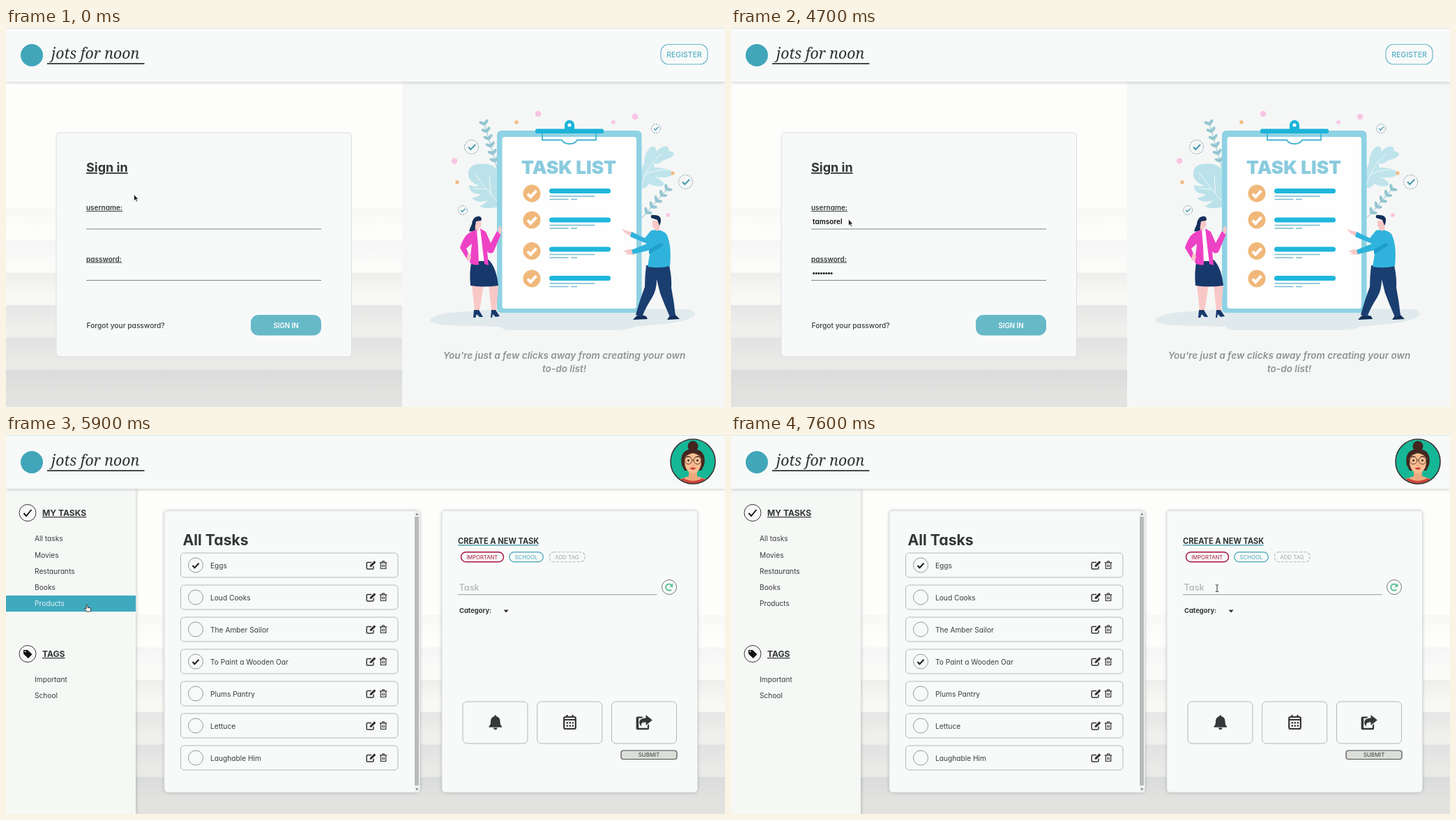
An HTML page for the animation above (8 s loop, 1031x543 px).

```html
<!DOCTYPE html>
<html lang="en">
<head>
<meta charset="utf-8">
<title>To-do list demo</title>
<style>
  html, body { margin: 0; width: 100%; height: 100%; overflow: hidden; background: #fdfdfc; }
  svg { display: block; width: 1031px; height: 543px; }
  text { font: 400 10.2px Inter, "Open Sans", sans-serif; font-feature-settings: "cv11"; fill: #3a3d3d; white-space: pre; }
  .semi { font-weight: 600; }
  .bold { font-weight: 700; fill: #333636; }
  .mid { text-anchor: middle; }
  .under { text-decoration: underline; }
  .motto { font: italic 600 13.6px Inter, sans-serif; fill: #8f9493; }
  .card { fill: #f8fafa; stroke: #dcdfdf; filter: drop-shadow(0 0 2px #0003); }
  .line { fill: none; stroke: #333; }
  .round { stroke-linecap: round; stroke-linejoin: round; }
  .box { fill: none; stroke: #b4b8b8; }
  .row.hover .box { stroke: #6db7c6; filter: drop-shadow(0 0 2px #4aa9bc); }
  .item rect { fill: none; }
  .item.hover rect { fill: #3fa9be; }
  .item.hover text { fill: #e4f3f5; }
</style>
</head>
<body>
<svg viewBox="0 0 1031 543">
  <defs><clipPath id="face"><circle cx="985" cy="38" r="31.5"/></clipPath></defs>
  <g id="backdrop"></g>

  <g id="login">
    <path d="M568 77h463v466H568z" fill="#f5f7f6"/>
    <g id="picture"></g>
    <rect class="card" x="72" y="150" width="423.5" height="321" rx="5" style="filter:none"/>
    <text class="bold under" x="115" y="206" style="font-size:18px">Sign in</text>
    <text class="semi under" x="115" y="261" style="font-size:10px">username:</text>
    <text class="semi under" x="115" y="334.5" style="font-size:10px">password:</text>
    <path d="M115 288h337M115 361.5h337" stroke="#808484"/>
    <text x="115.5" y="430" style="font-weight:500">Forgot your password?</text>
    <rect x="351" y="411" width="101" height="29.5" rx="11" fill="#67b9c8"/>
    <text class="semi mid" x="401.5" y="430" style="fill:#fff;font-size:9.7px">SIGN IN</text>
    <text id="user" class="semi" x="117" y="281" style="fill:#111;font-size:10px"></text>
    <path id="dots" class="round" stroke="#111" stroke-width="3" stroke-dasharray="0 3.65"/>
    <rect id="caret" width="1" height="14" fill="#222"/>
    <text class="mid motto" x="800.5" y="474">You're just a few clicks away from creating your own</text>
    <text class="mid motto" x="800.5" y="493">to-do list!</text>
  </g>

  <g id="app">
    <rect class="card" x="227" y="108.5" width="366.5" height="403.5" rx="5"/>
    <rect class="card" x="625" y="108.5" width="366.5" height="403.5" rx="5"/>
    <text class="bold" x="253.5" y="158" style="font-size:21.2px">All Tasks</text>
    <g id="rows"></g>
    <path d="M0 77h186v466H0z" fill="#f6f8f6" style="filter:drop-shadow(1px 0 2px #0003)"/>
    <g id="menu"></g>
    <text class="bold under" x="52" y="116" style="font-size:12.1px">MY TASKS</text>
    <text class="bold under" x="52" y="318" style="font-size:12.1px">TAGS</text>

    <text class="bold" x="648" y="155.5" style="font-size:11.1px">CREATE A NEW TASK</text>
    <path d="M648 157.8h115.5" stroke="#3c8fa2" stroke-width="1.2"/>
    <g fill="none" stroke-width="1.4">
      <rect x="652.5" y="167.7" width="61" height="14" rx="7" stroke="#a8143c"/>
      <rect x="721.8" y="167.7" width="48.5" height="14" rx="7" stroke="#5db1c1"/>
      <rect x="779.5" y="167.7" width="50.5" height="14" rx="6" stroke="#b2b6b6" stroke-width="1.1" stroke-dasharray="4 2"/>
    </g>
    <text class="mid" x="682.7" y="177.5" style="font-size:7.7px;fill:#a8143c">IMPORTANT</text>
    <text class="mid" x="746" y="177.5" style="font-size:7.8px;fill:#48a3b5">SCHOOL</text>
    <text class="mid" x="804.5" y="177.5" style="font-size:7.9px;fill:#a0a4a4">ADD TAG</text>
    <text class="semi" x="649.5" y="222.5" style="font-size:12.6px;fill:#b9bdbd">Task</text>
    <path d="M648 228.7h285.5" stroke="#969a9a"/>
    <circle class="line" cx="951" cy="218" r="10.5" style="stroke:#777"/>
    <path d="M954 221.5a4.6 4.6 0 1 1 .2-6.5" fill="none" stroke="#56c391" stroke-width="1.9"/>
    <path d="M956.3 212.5v5.2h-5.2z" fill="#56c391"/>
    <text class="bold" x="650" y="255" style="font-size:9.4px">Category:</text>
    <path d="M713.5 250.5h7.2l-3.6 4z" fill="#333"/>
    <rect class="box" x="655" y="382" width="93" height="60" rx="6"/>
    <rect class="box" x="761.7" y="382" width="93" height="60" rx="6"/>
    <rect class="box" x="868.5" y="382" width="93" height="60" rx="6"/>
    <g fill="#343838">
      <path d="M700.5 403v-1.5h2.5v1.5c4 1 5.5 4 5.5 7.5 0 4 1 5.5 2.5 7v1.2h-18.5v-1.2c1.5-1.5 2.5-3 2.5-7 0-3.5 1.5-6.5 5.5-7.5zM699 419.5h5.5a2.7 2.5 0 0 1-5.5 0z"/>
      <path d="M908 403.5h5.5l-2 2.2h-4.3v14h12.6v-4l2.3-1.5v6a2 2 0 0 1-2 2h-14.5a2 2 0 0 1-2-2v-14.7a2 2 0 0 1 2-2z"/>
      <path d="M917.5 401l9.3 7.5-9.3 7.5v-4.5c-6 0-7.5 2-6 6.5-6-5.5-4-12.3 6-12.5z"/>
    </g>
    <g class="line" stroke-width="2.2">
      <rect x="800.2" y="404" width="16.6" height="17" rx="2"/>
      <path d="M800 408h17M804.5 401v4M812.5 401v4"/>
      <path d="M803.5 412.3h10.5M803.5 416.7h10.5" stroke-dasharray="2.5 1.6"/>
    </g>
    <rect x="882" y="452" width="80" height="12.5" rx="3.5" fill="#dcded8" stroke="#4a4d4d" stroke-width="1.2"/>
    <text class="mid" x="922" y="461.2" style="font-size:7.9px">SUBMIT</text>
  </g>

  <path d="M0 0h1031v77H0z" fill="#f8fafa" style="filter:drop-shadow(0 1px 2px #0003)"/>
  <path d="M0 .5h1031" stroke="#dde6e8"/>
  <circle cx="37" cy="39" r="16" fill="#41a6ba"/>
  <text x="65" y="44" style="font:italic 300 21.3px 'Noto Serif',serif;fill:#303333">jots for noon</text>
  <path d="M59 51.2h139.5" stroke="#2d3030" stroke-width="1.8"/>
  <g id="register">
    <rect x="939" y="23.5" width="67" height="28.5" rx="11" fill="none" stroke="#6cb8c9" stroke-width="1.2"/>
    <text class="mid" x="972.5" y="41.5" style="font-size:10.5px;font-weight:500;fill:#55adc0">REGISTER</text>
  </g>

  <g id="loaded">
    <g class="line"><circle cx="31" cy="111.5" r="12"/><circle cx="31" cy="313.5" r="12"/></g>
    <path class="line" d="M25.5 112l3.5 4 7.5-9" stroke-width="1.9" style="stroke:#111"/>
    <path d="M25 308h6l6.5 6.2-5.6 5.8-6.9-6.5z" fill="#111"/><circle cx="27.5" cy="310.3" r="1" fill="#fff"/>
    <g clip-path="url(#face)">
      <path d="M950 0h70v75h-70z" fill="#15b796"/>
      <circle cx="985" cy="16" r="7.5" fill="#42261f"/>
      <path d="M969 43c-3-14 3-23 16-23s19 9 16 23l-4 8h-24z" fill="#42261f"/>
      <path d="M979 48h12v11l12 4 8 12h-52l8-12 12-4z" fill="#eda97e"/>
      <path d="M962 75c1-9 5-12 10-13 8 5 18 5 26 0 5 1 9 4 10 13z" fill="#cf4439"/>
      <path d="M973 35c1-6 7-8 12-9 5 1 11 3 12 9 1 10-4 20-12 20s-13-10-12-20z" fill="#f8bd91"/>
      <path d="M974.5 31.5q4-2 7 0M988.5 31.5q4-2 7 0" class="line" style="stroke:#42261f"/>
      <g class="line" style="stroke:#5b3930"><circle cx="978.5" cy="36.5" r="5.3"/><circle cx="991.5" cy="36.5" r="5.3"/><path d="M984 36h2M969 34l4 1M997 35l4-1"/></g>
      <circle cx="978.5" cy="36.5" r="1.3"/><circle cx="991.5" cy="36.5" r="1.3"/>
      <path d="M983.5 43.5q1.5 1 3 0" class="line" style="stroke:#d98c66"/>
      <path d="M980.5 47.5q4.5-2 9 0-4.5 4.5-9 0z" fill="#d23b3b"/>
    </g>
  </g>
  <circle id="ring" class="line" cx="985" cy="38" r="32" stroke-width="1.6"/>

  <g id="cursor">
    <path id="arrow" d="M0 0V9L2.1 7.2 3.6 10.5 5 9.9 3.6 6.7H6.3z" fill="#222" stroke="#fff" stroke-width=".6"/>
    <path id="beam" class="line" d="M-1.7-4.7h1.2l1 .7 1-.7h1.2M-1.7 5h1.2l1-.7 1 .7h1.2M.5-4v8.5"/>
    <path id="hand" d="M0 1q1-2 2 0v3.2l4 .8q1 .4.8 1.8l-.8 3.2H.8L-2.5 6.3q0-1.5 1.3-.8L0 6.3z" fill="#fff" stroke="#222" stroke-width=".9"/>
  </g>
</svg>
<script>
const $ = id => document.getElementById(id);
const each = (list, draw) => list.map(draw).join('');
const range = n => [...Array(n).keys()];
const tick = (x, y, s) => `<path d="M${x - 4 * s} ${y}l${3 * s} ${3.2 * s} ${6 * s} ${-6.4 * s}" fill="none"/>`;

// Backdrop: steps that start dark and fade out
const bands = [['#f8f9f7', '#fdfdfc'], ['#f4f5f4', '#fbfbfa'], ['#eeefed', '#f8f8f5'],
  ['#e5e6e5', '#efefed'], ['#e1e2e1', '#e9e9e7'], ['#d9dcdb', '#e2e2e0']];
$('backdrop').innerHTML = each(bands, ([top, low], i) => `
  <linearGradient id="band${i}" x2="0" y2="1"><stop stop-color="${top}"/><stop offset=".6" stop-color="${low}"/></linearGradient>
  <rect y="${258 + 46.4 * i}" width="1031" height="54" fill="url(#band${i})"/>`);

// Login illustration
const dot = color => ([x, y, r]) => `<circle cx="${x}" cy="${y}" r="${r}" fill="${color}"/>`;
const sprig = (x, y, angle, n) => `<g transform="translate(${x} ${y}) rotate(${angle})" fill="#95c6d1">
  <path d="M0 0V${-n * 11}" stroke="#95c6d1"/>${each(range(n), i => `
  <ellipse cx="-5.5" cy="${-11 * i - 9}" rx="5" ry="2.2" transform="rotate(38 0 ${-11 * i - 6})"/>
  <ellipse cx="5.5" cy="${-11 * i - 9}" rx="5" ry="2.2" transform="rotate(-38 0 ${-11 * i - 6})"/>`)}</g>`;
const badge = ([x, y, r]) => `<g stroke="#86a5af" fill="none"><circle cx="${x}" cy="${y}" r="${r}" stroke-dasharray="2.5 1.2"/>
  <g stroke="#4499b4" stroke-width="${r / 5}">${tick(x, y, r / 9)}</g></g>`;
const lobe = ([x, y, rx, ry, a]) => `<ellipse cx="${x}" cy="${y}" rx="${rx}" ry="${ry}" transform="rotate(${a} ${x} ${y})"/>`;
const job = ([disc, bar]) => `<circle cx="754" cy="${disc}" r="12.5" fill="#f0b87a"/>
  <g stroke="#fff" stroke-width="4">${tick(753.5, disc + .5, 1.4)}</g>
  <rect x="779" y="${bar - 3.5}" width="88" height="7" rx="3.5" fill="#1eb7db"/>
  <path d="M779.5 ${bar + 7.5}h65M779.5 ${bar + 12}h27M810 ${bar + 12}h9" stroke="#74bccd" stroke-width="1.3"/>`;

$('picture').innerHTML = `
  <path d="M608 418q10-11 55-12l50-4h190l75 1q12 3 9 9-12 10-56 13l-30 3q-8 5-30 5H724q-12 0-15-5l-75-2q-25-2-26-8z" fill="#e0eaed"/>
  <path d="M706 256q-18 5-27-1 8-3 12-8-16 5-23-4 8 0 13-5-17 0-17-13 8 3 15 1-18-6-16-20 2-10 13-11 24-3 31 12z" fill="#bbe2ea"/>
  <path d="M706 250q-19-20-35-43M690 231l-20-1M695 238l-2-27" fill="none" stroke="#f5f7f6"/>
  <g fill="#bfe4ec">${each([[924, 186, 8, 17, 16], [939, 182, 8, 15, 42], [944, 183, 6, 14, 78], [936, 207, 7, 20, 95], [928, 219, 6, 16, 110], [919, 208, 9, 22, 15]], lobe)}</g>
  <path d="M911 226q8-30 30-47M915 211q14-9 36-8" fill="none" stroke="#eff7f8"/>
  ${sprig(704, 200, -16, 6)}${sprig(912, 272, 41, 5)}
  ${each([[763, 123, 4.3], [902, 127, 4.3], [643, 190.5, 4.2], [871, 135, 2.8], [949, 268, 2.8]], dot('#f8c4e3'))}
  ${each([[732, 135, 2.8], [647, 221, 2.8], [956, 208, 2.8]], dot('#f2bd86'))}
  ${each([[667.5, 170.5, 10], [932, 144, 6.5], [974.5, 220.5, 10], [655, 261, 6.5]], badge)}
  <rect x="704" y="147" width="207.5" height="261" rx="6" fill="#8ed2e3"/>
  <rect x="711.5" y="156" width="192.5" height="246" rx="4" fill="#fefefe"/>
  <path d="M769 151v9.5h28q3 5.5 11 5.5t11-5.5h27V151" fill="none" stroke="#45b4cf" stroke-width="1.8"/>
  <path d="M801 146v-7a7 7 0 0 1 14 0v7z" fill="#1cb3d9"/><circle cx="808" cy="139" r="2.6" fill="#f5f7f6"/>
  <rect x="759" y="144.5" width="98" height="6.5" rx="2.5" fill="#1cb3d9"/>
  <text class="mid" x="807" y="208.5" style="font-size:26.2px;font-weight:900;fill:#8acbde">TASK LIST</text>
  ${each([[237, 233.5], [275, 275], [319.5, 317], [359, 358.5]], job)}

  <g id="woman">
    <path d="M668 367l4 39h7l6-39zM692 367l4 39h7l3-39z" fill="#f8c8c7"/>
    <path d="M671 404h7l6 10h-5l-4-4-2 5h-3zM696 404h6l6 9-6 1-4-4-1 5h-2z" fill="#17386b"/>
    <path d="M668 332h24c8 8 12 20 14 37q-21 3-40 0-2-20 2-37z" fill="#17386b"/>
    <path d="M673 288l11-1 3 47h-13z" fill="#fff"/>
    <path d="M664 291q2-6 4-10 1-10 8-11 6-1 6 5l-5 4-3 9q-4 5-10 3z" fill="#15305a"/>
    <path d="M674 277l7-1 .5 7q-1 4-4 3l.5 4-4 1-1.500-5z" fill="#f8c8c7"/>
    <path d="M675 289q-11 3-16 9-6 9-8 17 5 8 11 18l4-3-6-14 8-7-3 27q6 5 13 3l-1-26z" fill="#ee42c5"/>
    <path d="M680 287l8 5 7 16 9-17 6 4-11 26q-5 4-9-1l2 20-6-2z" fill="#ee42c5"/>
    <path d="M706 293q-1-8 2-10l3 6-2 7zM660 331l3-10 4 7-2 6z" fill="#f8c8c7"/>
  </g>

  <g id="man">
    <path d="M899 418q4-5 9-8l10 3 2 4zM948 418l4-6 7-2 7 7z" fill="#122e58"/>
    <path d="M918 340h33q4 18 3 32 4 20 6 40l-8 2q-8-18-14-34l-5-20q0 16-7 27-8 12-14 27l-9-3q6-22 13-40 0-16 2-31z" fill="#1b3e70"/>
    <path d="M900 293l-8-2-9-3 4 5 6 4 7 2zM901 318l-8-1-8 3 6 2-3 2 13 1z" fill="#f8c8c7"/>
    <path d="M897 292l19 9 9-11q14-3 22 5 8 16 5 46-15 4-32 1l4-24-25 6-2-6 22-9-24-10z" fill="#2fb3dc"/>
    <path d="M922 317l17-9 4 3-21 13z" fill="#1c9fca"/>
    <path d="M927 276h11l-1 13q-4 4-7-1l-3-4z" fill="#f8c8c7"/>
    <path d="M925 272q-1-5 3-4 10-1 11 6 0 6-2 9l-3-8z" fill="#122e58"/>
  </g>`;

// Task rows
const tasks = ['Eggs', 'Loud Cooks', 'The Amber Sailor', 'To Paint a Wooden Oar', 'Plums Pantry', 'Lettuce', 'Laughable Him'];
$('rows').innerHTML = each(tasks, (name, i) => `<g class="row" transform="translate(0 ${186.5 + 46 * i})">
  <rect class="box" x="250.5" y="-17.5" width="311.5" height="35" rx="5" style="fill:#f8fafa"/>
  <circle cx="272" cy="0" r="10.5" fill="none" stroke="#8a8e8e" stroke-width=".9"/>
  ${i == 0 || i == 3 ? `<g stroke="#222" stroke-width="2.2">${tick(271.5, .5, 1)}</g>` : ''}
  <text x="293" y="4">${name}</text>
  <g class="line" stroke-width="1.5"><path d="M524-4h-5.5q-1.3 0-1.3 1.3v7q0 1.3 1.3 1.3h7.2q1.3 0 1.3-1.3v-3"/>
  <path d="M535.8-3.7h10.5M539-4.5l1-1.2h2l1 1.2M537.3-3.5v8.5h7.4v-8.5M539.8-1v4M542.2-1v4" stroke-width="1.2"/></g>
  <path d="M521.5 2.5l.6-2.8 6-6 2.3 2.3-6 6z" fill="#333"/></g>`) + `
  <path d="M586 109h6.5v403H586z" fill="#eef0f0"/><path d="M586 117h6v385h-6z" fill="#b9bbbb"/>
  <path d="M587.5 114.5h3.6l-1.8-2.5zM587.5 506.5h3.6l-1.8 2.5z" fill="#555"/>`;

// Side menu
const menu = [['All tasks', 148], ['Movies', 172], ['Restaurants', 195], ['Books', 218], ['Products', 241.5], ['Important', 350], ['School', 373]];
$('menu').innerHTML = each(menu, ([name, y]) => `<g class="item"><rect y="${y - 11.5}" width="186" height="23"/>
  <text x="41" y="${y + 3.8}">${name}</text></g>`);
const items = document.querySelectorAll('.item'), rows = document.querySelectorAll('.row');

// Pointer route: time, x, y
const route = [[0, 183.5, 238.5], [500, 183.5, 238.5], [800, 168.5, 274], [5600, 168.5, 274], [5900, 115, 243],
  [6100, 466, 125], [6200, 466, 125], [6300, 478, 121], [6500, 484.5, 183.5], [7100, 492, 462], [7200, 505, 474], [7600, 696.5, 219.5], [8000, 696.5, 219.5]];
function pointer(t) {
  const i = route.findIndex(key => key[0] > t);
  const [t0, x0, y0] = route[i - 1], [t1, x1, y1] = route[i];
  const p = (t - t0) / (t1 - t0);
  return [x0 + (x1 - x0) * p, y0 + (y1 - y0) * p];
}

const userKeys = [2000, 2000, 2100, 2100, 2300, 2400, 2400, 2500];
const passKeys = [3000, 3100, 3300, 3400, 3600, 3700, 3900, 4000];
const typed = (keys, t) => keys.filter(k => k <= t).length;
const show = (id, on) => { $(id).style.display = on ? '' : 'none'; };
const within = (t, a, b) => t >= a && t < b;

function draw(now) {
  const t = Math.floor(now % 8000 / 100) * 100;
  const login = t < 5000, loaded = t >= 5500;
  show('login', login);
  show('register', login);
  show('app', !login);
  show('ring', !login);
  show('loaded', loaded);
  show('rows', loaded);

  if (login) {
    const count = typed(passKeys, t), inPassword = t >= 2700;
    $('user').textContent = 'tamsorel'.slice(0, typed(userKeys, t));
    $('dots').setAttribute('d', count ? `M118.6 351.5h${3.65 * (count - 1) + .01}` : '');
    $('caret').setAttribute('x', 116.5 + (inPassword ? 3.65 * count : $('user').getComputedTextLength()));
    $('caret').setAttribute('y', inPassword ? 344.5 : 270);
    show('caret', within(t, 1100, 1600) || within(t, 2000, 4600));
  }

  const [x, y] = pointer(t);
  let overItem = false;
  items.forEach((el, i) => {
    const on = t >= 5700 && x < 186 && Math.abs(y - menu[i][1]) < 11.5;
    el.classList.toggle('hover', on);
    overItem ||= on;
  });
  rows.forEach((el, i) => el.classList.toggle('hover',
    loaded && within(x, 250, 562) && Math.abs(y - 186.5 - 46 * i) < 17.5));

  const beam = within(t, 800, 4700) || within(t, 5000, 5700) || t >= 7600;
  show('beam', beam);
  show('hand', overItem);
  show('arrow', !beam && !overItem);
  $('cursor').setAttribute('transform', `translate(${x} ${y})`);
  requestAnimationFrame(draw);
}
requestAnimationFrame(draw);
</script>
</body>
</html>
```
